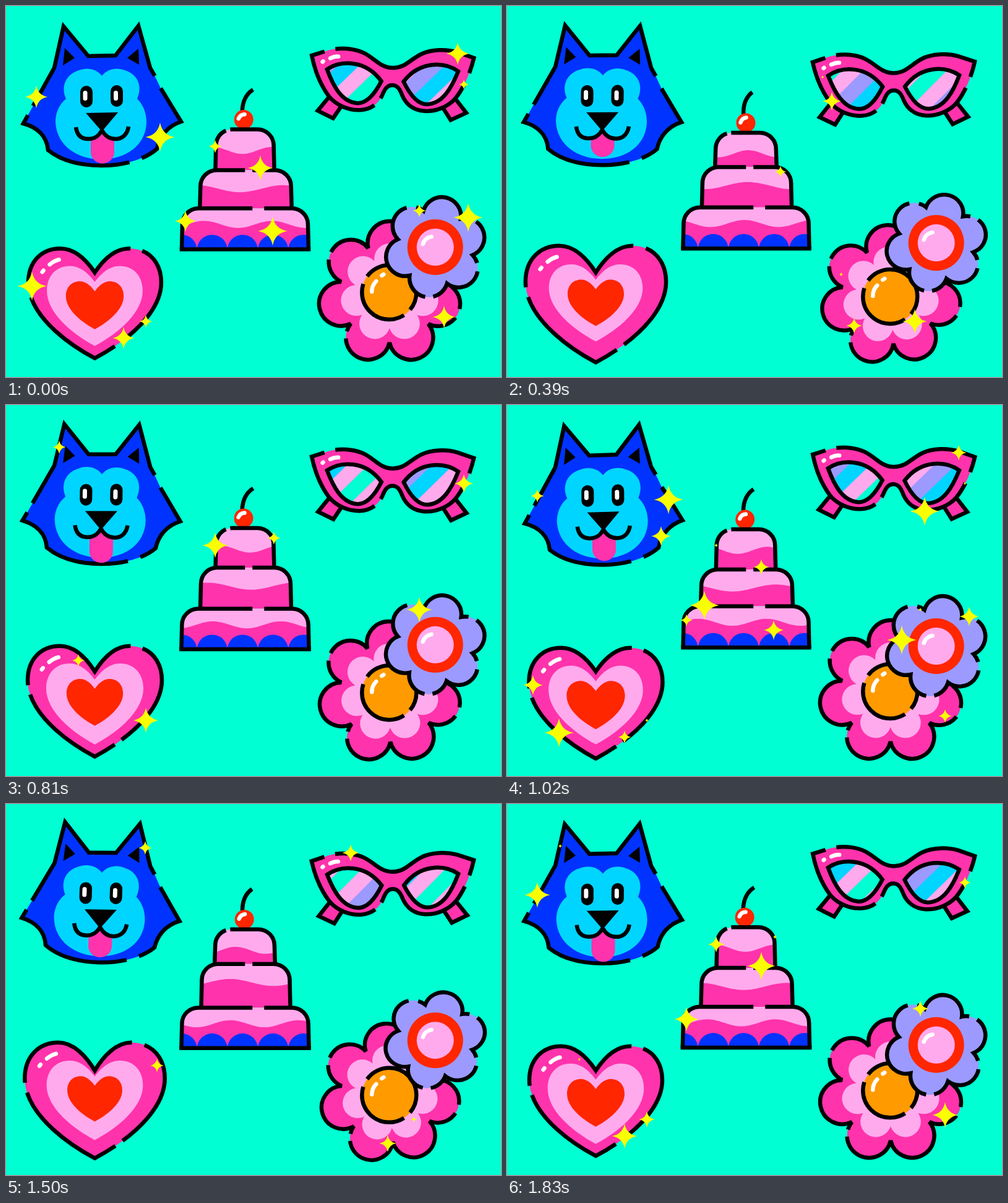
Write an HTML page that moves like this. It is 800 by 600 pixels and loops after 1860 ms.

```html
<!DOCTYPE html>
<html lang="en">
<head>
<meta charset="utf-8">
<title>Sticker set</title>
<style>
  html, body { margin: 0; width: 100%; height: 100%; overflow: hidden; background: #00ffd2; }
  svg { display: block; width: 800px; height: 600px; }
  .line { fill: none; stroke: #000; stroke-width: 6.5; }
  .shine { fill: none; stroke: #fff; stroke-width: 6.5; stroke-linecap: round; }
  .hot { fill: #ff33ac; }
  .soft { fill: #ffaaec; }
  .blue { fill: #0033ff; }
  .cyan { fill: #00d5ff; }
  .lilac { fill: #9c9aff; }
  .red { fill: #ff2600; }
  .orange { fill: #ff9a00; }
  .white { fill: #fff; }
  .outlined { stroke: #000; stroke-width: 6.5; }
  #sparks { fill: #faff00; }
</style>
</head>
<body>
<svg viewBox="0 0 800 600">
  <defs>
    <path id="lens" d="M-106 104C-84 89-44 87-18 122C-30 146-42 158-56 158C-82 157-96 130-106 104Z"/>
    <clipPath id="lensClip">
      <use href="#lens"/>
      <use href="#lens" transform="scale(-1 1)"/>
    </clipPath>
  </defs>

  <g id="dog">
    <path class="blue outlined" stroke-dasharray="154 21 215.5 17 999"
      d="M250 133L283 187C262 194 248 210 244 231C225 248 190 258 155 258C130 258 95 255 68 233C66 210 50 196 28 190L78 100L93 33L133 81L177 80L214 32L233 100L240.5 113"/>
    <path d="M95 68L111 84L92 96ZM214 69L196 84L215 95Z"/>
    <path class="cyan" d="M155 113C146 101 130 99 118 104C97 110 88 130 97 150C84 161 80 175 80 188C82 226 115 248 154 248C193 248 226 226 227 188C227 175 223 161 212 150C221 130 213 110 192 104C180 99 164 101 155 113Z"/>
    <rect x="120" y="129" width="20" height="35" rx="10"/>
    <rect x="169" y="128" width="20" height="35" rx="10"/>
    <rect class="white" x="124.5" y="137" width="7" height="16" rx="3.5"/>
    <rect class="white" x="174" y="137" width="7" height="16" rx="3.5"/>
    <path id="tongue" class="hot"/>
    <path d="M129 173L181 172L155 203Z"/>
    <path class="line" d="M113 196C115 211 124 215 133 215C144 215 150 210 155 201C160 210 167 215 177 215C187 215 196 209 198 195"/>
  </g>

  <g id="glasses">
    <path class="hot outlined" d="M-100 146L-120 171L-95 183L-80 160ZM100 146L120 171L95 183L80 160Z"/>
    <path class="hot outlined" pathLength="673" stroke-dasharray="30 15 174 18 264 19 999"
      d="M0 128C-8 128-12 134-16 144C-22 158-34 168-52 169C-70 170-90 162-102 148C-116 130-126 105-131 82L-104 73C-86 68-62 69-46 77C-28 86-20 100 0 100C20 100 28 86 46 77C62 69 86 68 104 73L131 82C126 105 116 130 102 148C90 162 70 170 52 169C34 168 22 158 16 144C12 134 8 128 0 128"/>
    <g clip-path="url(#lensClip)"><g id="stripes"></g></g>
    <use href="#lens" class="line"/>
    <use href="#lens" class="line" transform="scale(-1 1)"/>
    <path class="shine" d="M-113.500 92l1-1M-101 86Q-94 82.500-88 83"/>
  </g>

  <g id="cake">
    <g id="cherry">
      <path class="line" d="M-3-14C-3-30 3-42 13-49"/>
      <circle class="red" r="15.5"/>
      <path class="shine" d="M-8.500-1Q-6-8 1-8.500"/>
    </g>
  </g>

  <g id="heart">
    <path id="heartOuter" class="hot outlined" pathLength="636" stroke-dasharray="62 19 232 15 179 13 999"/>
    <path id="heartMid" class="soft"/>
    <path id="heartCore" class="red"/>
    <path id="heartShine" class="shine" d="M-85 38l2-2.500M-73 26Q-66 20-58 18"/>
  </g>

  <g id="daisy">
    <path id="daisyOuter" class="hot outlined" pathLength="70" stroke-dasharray="0 1.2 21.8 .9 14.5 1 99"/>
    <path id="daisyInner" class="soft"/>
  </g>
  <g id="daisyEye">
    <circle class="orange outlined" r="44" pathLength="360" stroke-dasharray="40 17 141 18 999"/>
    <path class="shine" d="M-28-1Q-28-11-21-18M-12-27l3-2"/>
  </g>

  <g id="violet">
    <path id="violetOuter" class="lilac outlined" pathLength="60" stroke-dasharray="6.3 1.5 8.8 1.5 10.4 1.4 22 1.7 99"/>
    <circle class="red" r="45"/>
    <circle class="soft" r="30"/>
    <path class="shine" d="M-20-5Q-17-15-6-17"/>
  </g>

  <g id="sparks"></g>
</svg>

<script>
const PERIOD = 930, STEP = 30, SPARK_LIFE = 280;
const $ = id => document.getElementById(id);

function add(parent, tag, attrs) {
  const el = document.createElementNS('http://www.w3.org/2000/svg', tag);
  for (const key in attrs) el.setAttribute(key, attrs[key]);
  return parent.appendChild(el);
}
const setPath = (el, d) => el.setAttribute('d', d);
const place = (el, x, y, rest = '') => el.setAttribute('transform', `translate(${x} ${y}) ${rest}`);

// Ring of n round petals of radius r, their centres at distance d.
function flower(n, d, r, startDeg) {
  const half = Math.PI / n, start = startDeg * Math.PI / 180;
  const notch = d * Math.cos(half) + Math.sqrt(r * r - (d * Math.sin(half)) ** 2);
  const at = (dist, k) => `${dist * Math.cos(start + k * half)} ${dist * Math.sin(start + k * half)}`;
  let path = 'M' + at(d + r, 0);
  for (let k = 1; k <= 2 * n; k++) path += `A${r} ${r} 0 0 1 ${at(k % 2 ? notch : d + r, k)}`;
  return path;
}

function heart(w, top, tip, notch) {
  const h = tip - top, side = top + .31 * h, dip = (top + notch) / 2;
  return `M${w} ${side}C${w} ${top + .12 * h} ${.8 * w} ${top} ${.52 * w} ${top}` +
    `C${.3 * w} ${top} ${.12 * w} ${dip} 0 ${notch}` +
    `C${-.12 * w} ${dip} ${-.3 * w} ${top} ${-.52 * w} ${top}` +
    `C${-.8 * w} ${top} ${-w} ${top + .12 * h} ${-w} ${side}` +
    `C${-w} ${top + .58 * h} ${-.5 * w} ${top + .84 * h} 0 ${tip}` +
    `C${.5 * w} ${top + .84 * h} ${w} ${top + .58 * h} ${w} ${side}`;
}

// Cake tiers, drawn from the top one down.
function makeTier(name, spec) {
  const clip = add(add($('cake'), 'clipPath', { id: name }), 'path', {});
  const body = add($('cake'), 'path', { class: 'soft' });
  const inner = add($('cake'), 'g', { 'clip-path': `url(#${name})` });
  const icing = add(inner, 'path', { class: 'hot' });
  const line = add($('cake'), 'path', { class: 'line' });
  return { ...spec, clip, body, inner, icing, line };
}
const tiers = [
  makeTier('tierTop', { cx: 386, gap: [355, 362], drop: 34, wave: 96, dip: 382 }),
  makeTier('tierMid', { cx: 387.5, gap: [386, 398], drop: 30, wave: 140, dip: 378 }),
  makeTier('tierLow', { cx: 386.5, gap: [398, 417], drop: 26, wave: 110, dip: 375 })
];
const scallops = add(tiers[2].inner, 'g', { class: 'blue' });
for (let i = 0; i < 5; i++) add(scallops, 'circle', { cx: 284 + 49.2 * i, r: 24.6 });
const plate = add($('cake'), 'path', { class: 'line' });

function drawTier(tier, w, top, base, phase) {
  const R = 26, l = tier.cx - w, r = tier.cx + w;
  const d = `M${l - 1} ${base}L${l} ${top + R}A${R} ${R} 0 0 1 ${l + R} ${top}H${r - R}` +
    `A${R} ${R} 0 0 1 ${r} ${top + R}L${r + 1} ${base}`;
  for (const el of [tier.clip, tier.body, tier.line]) setPath(el, d);
  const [from, to] = tier.gap;
  const before = base - top - R + R * Math.PI / 2 + from - l - R;
  tier.line.setAttribute('stroke-dasharray', `${before} ${to - from} 999`);

  const dip = tier.dip - tier.wave * phase;
  let icing = `M${r + 6} ${base}H${l - 6}`;
  for (let x = l - 6; x <= r + 6; x += 4)
    icing += `L${x} ${top + tier.drop + 5.7 * Math.cos(2 * Math.PI * (x - dip) / tier.wave)}`;
  setPath(tier.icing, icing + 'Z');
}

// Diagonal lens stripes, 34 px wide along x + y.
const stripeColors = ['#00ffd2', '#ffaaec', '#9c9aff', '#00d5ff', '#ffaaec'];
for (let i = -10; i < 10; i++) {
  add($('stripes'), 'path', {
    fill: stripeColors[(i + 10) % 5],
    d: `M${i * 34} 0h34.5l-200 200h-34.5Z`
  });
}

setPath($('daisyOuter'), flower(7, 80.3, 35.7, 13));
setPath($('daisyInner'), flower(7, 55, 25, 13));
setPath($('violetOuter'), flower(6, 51, 31, -78));

// Sparkles: x, y, moment of appearing, optional size.
const sparks = [
  [249, 212, 0], [49, 147, 868], [261, 153, 90], [225, 71, 420], [86, 68, 655],
  [730, 77, 0, 18.5], [740, 127, 780, 17], [675, 172, 90], [510, 115, 145, 20], [525, 154, 285], [557, 79, 450],
  [411, 262, 890], [431, 364, 0], [290, 348, 855], [338, 227, 775], [319, 324, 90], [442, 268, 220], [433, 215, 655],
  [42, 453, 0], [190, 537, 862], [226, 510, 773], [84, 530, 90], [244, 423, 420], [117, 413, 650],
  [747, 342, 0], [708, 503, 867], [668, 331, 775], [638, 380, 90], [540, 434, 145], [659, 510, 345],
  [561, 517, 260], [617, 549, 450]
].map(([x, y, start, size = 23.5]) => ({
  x, y, start, size,
  el: add($('sparks'), 'path', { d: 'M0-1Q.15-.15 1 0Q.15.15 0 1Q-.15.15-1 0Q-.15-.15 0-1Z' })
}));

function draw(t) {
  const phase = t / PERIOD;
  const osc = peak => Math.cos(2 * Math.PI * (t - peak) / PERIOD);
  const sway = osc(45), sink = .95 - sway;

  const nod = .53 - osc(150);
  place($('dog'), -nod, -1.2 * nod, `rotate(${1.25 * nod} 155 155)`);
  const lick = 232 + 5.8 * osc(820);
  setPath($('tongue'), `M137 214L155 204L175 214V${lick}A19 18.5 0 0 1 137 ${lick}Z`);

  place($('glasses'), 625, 4.9 - 5.1 * sway, `rotate(${.25 + .65 * sway} 0 95)`);
  place($('stripes'), 77 + 170 * phase, 0);

  const top = 202 + 3 * osc(370), mid = 262.3 + 3.7 * osc(80);
  const low = 327.3 - 3.2 * osc(230), base = 393.4 - 2.1 * osc(240);
  place($('cherry'), 385 + osc(370), top - 16, `rotate(${-3 * osc(370)})`);
  drawTier(tiers[0], 47.6 + 1.2 * osc(370), top, mid, phase);
  drawTier(tiers[1], 72.2 + 1.2 * osc(80), mid, low, phase);
  const lowW = 101.5 - .9 * osc(230);
  drawTier(tiers[2], lowW, low, base, phase);
  place(scallops, 0, base + 1);
  setPath(plate, `M${tiers[2].cx - lowW - 4.25} ${base}h${2 * lowW + 8.5}`);

  const w = 110.7 + 3.3 * osc(465), crown = 389.3 + 3.5 * osc(90);
  place($('heart'), 143.5, 0);
  setPath($('heartOuter'), heart(w, crown, 572.5 + 4 * osc(350), 431));
  const midTop = 418.3 + 3.3 * osc(130), midTip = 546 + 3.8 * osc(-20);
  setPath($('heartMid'), heart(77 + 1.8 * osc(730), midTop, midTip, midTop + .2 * (midTip - midTop)));
  const coreTop = 443.2 + 3 * osc(120), coreTip = 519 + 5.5 * osc(120);
  setPath($('heartCore'), heart(45.8 + 1.4 * osc(130), coreTop, coreTip, coreTop + .21 * (coreTip - coreTop)));
  place($('heartShine'), .8 * (107.5 - w), crown);

  place($('daisy'), 620, 464 + 2.3 * sink, `rotate(${-2.1 * sink}) scale(${1 - .0125 * sink})`);
  place($('daisyEye'), 619.3, 463 + 4.2 * sink);
  place($('violet'), 693.7, 390 - 4.2 * sink);
  $('violetOuter').setAttribute('transform', `scale(1 ${1 - .018 * sink}) rotate(${1.5 * sink})`);

  for (const s of sparks) {
    const age = (t - s.start + PERIOD) % PERIOD;
    const r = Math.max(0, s.size * (1 - age / SPARK_LIFE));
    s.el.setAttribute('visibility', r > 0 ? 'visible' : 'hidden');
    place(s.el, s.x, s.y, `scale(${r})`);
  }
}

const begin = performance.now();
function tick() {
  const t = (performance.now() - begin) % PERIOD;
  draw(Math.floor(t / STEP) * STEP);
  requestAnimationFrame(tick);
}
tick();
</script>
</body>
</html>
```
